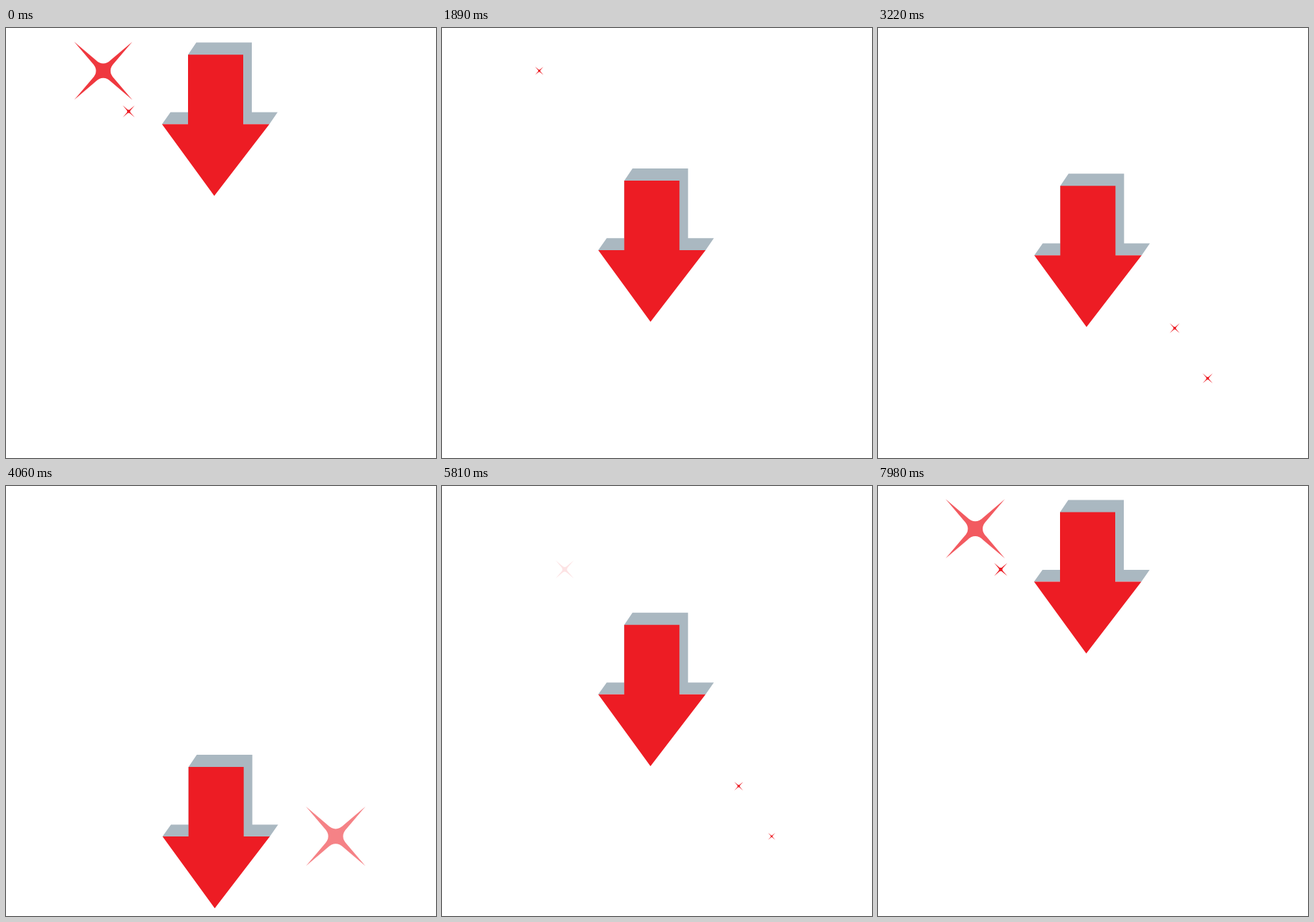
Recreate the animation shown at these times as an HTML page. Size 600 by 600 pixels, loop 8000 ms.

```html
<!DOCTYPE html>
<html lang="en">
<head>
<meta charset="utf-8">
<title>Bouncing arrow</title>
<style>
  html, body { margin: 0; height: 100%; overflow: hidden; background: #fff; }
  svg { display: block; width: 100vw; height: 100vh; }
</style>
</head>
<body>
<svg viewBox="0 0 600 600">
  <g id="arrow">
    <path fill="#aab8c1" d="M217.7 133.6 229.5 117H254V36.6L265.5 19.6H343V117H379L367.5 133.6Z"/>
    <path fill="#ed1c24" d="M254 36.6H331V133.6H367.5L290.6 233.8 217.7 133.6H254Z"/>
  </g>
  <g id="stars" fill="#ed1c24"></g>
</svg>
<script>
const LOOP = 8000, STEP = 70, PERIOD = 2640;
const TRAVEL = 363;
// The arrow rests briefly at each end; the fall is a little quicker than the rise.
const FALL_START = 73, FALL = 1227, RISE_DELAY = 1242, RISE = 1375;
const GROW = 1110, FADE = 400;

// Half-width at full size, time growth starts, delay until the fade.
const stars = [
  { x: 135.7, y: 59.7, size: 41.5, start: 1630, fadeAfter: 960 },
  { x: 171.2, y: 116.4, size: 12.7, start: 1970, fadeAfter: 850 },
  { x: 460, y: 488.8, size: 41.5, start: 290, fadeAfter: 950 },
  { x: 414, y: 418.8, size: 12.7, start: -10, fadeAfter: 910 },
];

const clamp = v => Math.min(1, Math.max(0, v));
const mod = (a, n) => ((a % n) + n) % n;
const smooth = u => u * u * (3 - 2 * u);

// cubic-bezier(.31, 0, .45, 1)
function ease(x) {
  let low = 0, high = 1;
  for (let i = 0; i < 24; i++) {
    const u = (low + high) / 2, v = 1 - u;
    if (3 * .31 * u * v * v + 3 * .45 * u * u * v + u ** 3 < x) low = u;
    else high = u;
  }
  return smooth(low);
}

// One concave side between two tips, turned to make all four.
function starPath() {
  const side = [[-1, -1], [-.27, -.38], [-.14, -.25], [0, -.25], [.14, -.25], [.27, -.38], [1, -1]];
  let d = 'M-1 -1';
  for (let k = 0; k < 4; k++) {
    const p = side.map(([x, y]) => {
      for (let i = 0; i < k; i++) [x, y] = [-y, x];
      return x + ' ' + y;
    });
    d += `L${p[1]}Q${p[2]} ${p[3]}Q${p[4]} ${p[5]}L${p[6]}`;
  }
  return d + 'Z';
}

const arrow = document.getElementById('arrow');
const group = document.getElementById('stars');
for (const star of stars) {
  star.node = document.createElementNS('http://www.w3.org/2000/svg', 'path');
  star.node.setAttribute('d', starPath());
  group.append(star.node);
}

function draw(t) {
  const time = mod(t - FALL_START, PERIOD);
  const drop = ease(clamp(time / FALL)) - ease(clamp((time - RISE_DELAY) / RISE));
  arrow.setAttribute('transform', `translate(${.7 * drop} ${TRAVEL * drop})`);

  for (const { x, y, size, start, fadeAfter, node } of stars) {
    const age = mod(t - start, PERIOD);
    const scale = size * smooth(clamp(age / GROW));
    node.setAttribute('transform', `translate(${x} ${y}) scale(${scale})`);
    node.setAttribute('opacity', 1 - clamp((age - fadeAfter) / FADE));
  }
}

const origin = performance.now();
function tick() {
  const t = (performance.now() - origin) % LOOP;
  draw(Math.floor(t / STEP) * STEP);
  requestAnimationFrame(tick);
}
tick();
</script>
</body>
</html>
```
